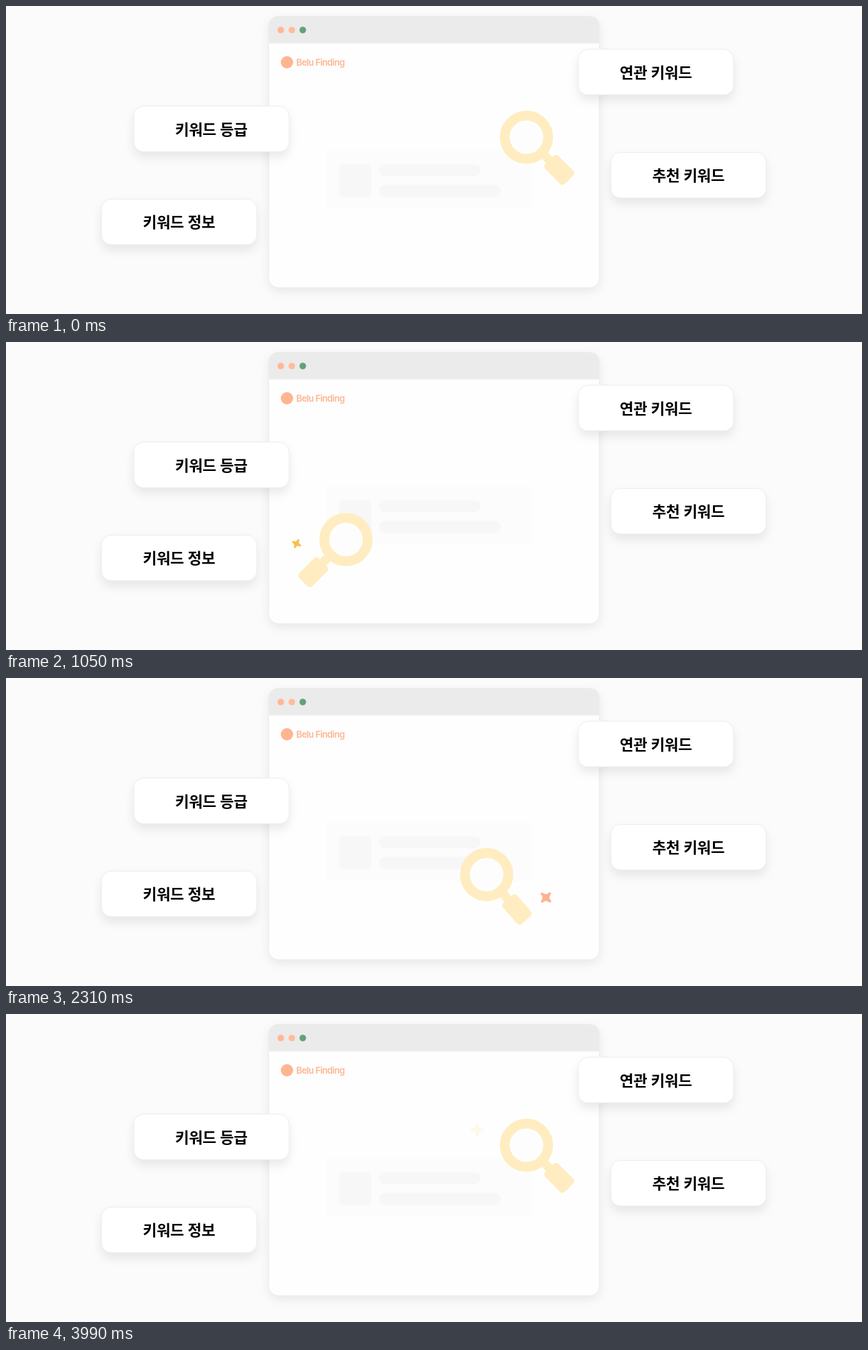
An HTML page for the animation above (4.06 s loop, 1246 by 449 pixels).

```html
<!DOCTYPE html>
<html lang="ko">
<head>
<meta charset="utf-8">
<style>
  html, body { margin: 0; width: 100%; height: 100%; overflow: hidden; background: #fbfbfb; }
  svg { display: block; width: 1246px; height: 449px; }
  .window { filter: drop-shadow(0 5px 7px rgba(0,0,0,.08)); }
  .label { filter: drop-shadow(0 8px 7px rgba(0,0,0,.08)); }
  .label rect { fill: #fff; stroke: #ececec; }
  .label text { font: 700 22px "Noto Sans CJK KR", "Noto Sans CJK", sans-serif; letter-spacing: -.4px; text-anchor: middle; }
  .brand { font: 600 13px Inter, sans-serif; letter-spacing: -.6px; fill: #ffb592; }
</style>
</head>
<body>
<svg viewBox="0 0 1246 449">
  <defs>
    <clipPath id="list"><rect x="460" y="168" width="312" height="158"/></clipPath>
    <clipPath id="frame"><rect x="382.5" y="15" width="481" height="395.5" rx="14"/></clipPath>
    <g id="card">
      <rect x="466" y="211" width="300" height="85" rx="8" fill="#fcfcfc"/>
      <g fill="#f7f7f7">
        <rect x="484.5" y="230.5" width="47.5" height="47.5" rx="5"/>
        <rect x="543" y="230.5" width="148" height="17.5" rx="8.7"/>
        <rect x="543" y="260.5" width="177" height="17.5" rx="8.7"/>
      </g>
    </g>
    <path id="star" d="M0-10Q1.8-10 2.2-6Q2.8-2.8 6-2.2Q10-1.8 10 0Q10 1.8 6 2.2Q2.8 2.8 2.2 6Q1.8 10 0 10Q-1.8 10-2.2 6Q-2.8 2.8-6 2.2Q-10 1.8-10 0Q-10-1.8-6-2.2Q-2.8-2.8-2.2-6Q-1.8-10 0-10Z"/>
  </defs>

  <g class="window">
    <rect x="382.5" y="15" width="481" height="395.5" rx="14" fill="#fefefe" stroke="#eeeeee"/>
    <rect x="382" y="14" width="482" height="40.5" fill="#ebebeb" clip-path="url(#frame)"/>
  </g>
  <circle cx="400" cy="35" r="4.8" fill="#ffb796"/>
  <circle cx="416" cy="35" r="4.8" fill="#ffbc9c"/>
  <circle cx="432" cy="35" r="4.8" fill="#62a17d"/>
  <circle cx="409" cy="82" r="9" fill="#ffb592"/>
  <text class="brand" x="422.5" y="87">Belu Finding</text>

  <g clip-path="url(#list)">
    <use id="leaving" href="#card"/>
    <use id="entering" href="#card"/>
  </g>
  <g id="stars"></g>
  <g id="lens" fill="#ffedc1">
    <path d="M36-6.5H50V6.5H36Z"/>
    <rect x="47" y="-13.5" width="40.7" height="27" rx="5"/>
    <circle r="31.6" fill="#fdfdfd" stroke="#ffedc1" stroke-width="14.3"/>
  </g>
  <g id="labels"></g>
</svg>
<script>
const LOOP = 4060, MOVE = 800, SCROLL = 550, LAG = 55;
const $ = id => document.getElementById(id);
const clamp = v => Math.max(0, Math.min(1, v));
const smooth = v => (v = clamp(v), v * v * (3 - 2 * v));

$('labels').innerHTML = [
  ['키워드 등급', 186, 146], ['키워드 정보', 139, 281.5],
  ['연관 키워드', 833, 63], ['추천 키워드', 880.5, 213.5]
].map(([text, x, y]) => `<g class="label" transform="translate(${x} ${y})">
  <rect width="226" height="66.5" rx="14"/><text x="112.8" y="41.5">${text}</text></g>`).join('');

// Resting poses of the magnifier: x, y, handle angle
const right = [757.6, 191.3, 45], left = [494.8, 288, 135], low = [699.6, 286.6, 49];
// bend shifts the control point away from the middle of the straight path
const moves = [
  { start: 222, from: right, to: left, bend: [0, -18] },
  { start: 1508, from: left, to: low, bend: [0, -13] },
  { start: 2769, from: low, to: right, bend: [9, 14] }
];
const scrolls = [211, 1173, 2527];
const stars = [
  { x: 423, y: 294, color: '#fabe4e', start: 960, life: 720 },
  { x: 786, y: 320, color: '#feb291', start: 2200, life: 650 },
  { x: 686, y: 169, color: '#fcd36f', start: 3480, life: 528 }
];
$('stars').innerHTML = stars.map(s => `<use href="#star" fill="${s.color}"/>`).join('');

function drawLens(t) {
  const move = moves.findLast(m => t >= m.start) || moves[0];
  const p = smooth((t - move.start) / MOVE);
  const [x, y, angle] = move.from.map((a, i) =>
    a + (move.to[i] - a) * p + 2 * p * (1 - p) * (move.bend[i] || 0));
  $('lens').setAttribute('transform', `translate(${x} ${y}) rotate(${angle})`);
}

function drawCards(t) {
  const age = t - (scrolls.findLast(s => t >= s) ?? scrolls[0]);
  const shift = (id, y) => $(id).setAttribute('transform', `translate(0 ${y})`);
  shift('leaving', -130 * smooth((age - LAG) / SCROLL));
  shift('entering', 118 * (1 - smooth(age / SCROLL)));
}

function drawStars(t) {
  stars.forEach((s, i) => {
    const k = (t - s.start) / s.life;
    const star = $('stars').children[i];
    star.setAttribute('transform',
      `translate(${s.x} ${s.y}) rotate(${90 * smooth(k / .35)}) scale(${clamp(k / .17)})`);
    star.setAttribute('opacity', k > 0 ? clamp((1 - k) / .22) : 0);
  });
}

function draw() {
  const t = performance.now() % LOOP;
  drawLens(t);
  drawCards(t);
  drawStars(t);
  requestAnimationFrame(draw);
}
draw();
</script>
</body>
</html>
```
